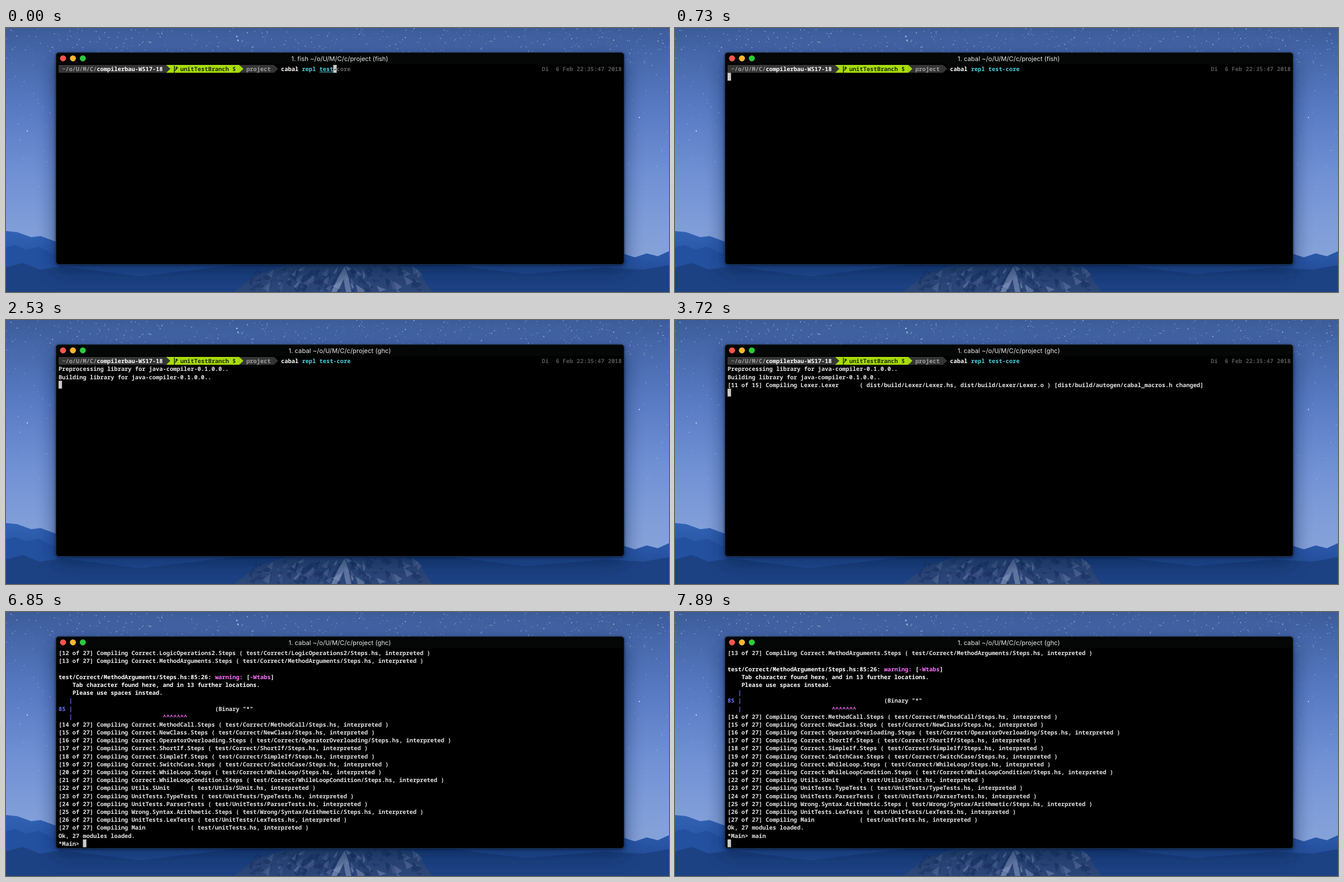
Animation of 1186x472 px, one loop 8 s. Source, as an HTML page:

```html
<!DOCTYPE html>
<html lang="en">
<head>
<meta charset="utf-8">
<title>Terminal session</title>
<style>
  html, body { margin: 0; width: 100%; height: 100%; overflow: hidden; background: #000; }
  svg { display: block; width: 100vw; height: 100vh; }
  text { white-space: pre; text-rendering: geometricPrecision; }
  #screen { font: 600 10.367px "Noto Sans Mono", "DejaVu Sans Mono", monospace; }
  #title { font: 400 11.3px Inter, Roboto, sans-serif; fill: #e6e6e6; text-anchor: middle; }
</style>
</head>
<body>
<svg viewBox="0 0 1186 472" preserveAspectRatio="none">
  <defs>
    <linearGradient id="sky" x1="0" y1="0" x2="0" y2="1">
      <stop offset="0" stop-color="#3c5c99"/>
      <stop offset=".1" stop-color="#4667a9"/>
      <stop offset=".3" stop-color="#587ac3"/>
      <stop offset=".55" stop-color="#7090d4"/>
      <stop offset=".75" stop-color="#7f9dd8"/>
      <stop offset=".88" stop-color="#86a2da"/>
    </linearGradient>
    <linearGradient id="land" x1="0" y1="360" x2="0" y2="472" gradientUnits="userSpaceOnUse">
      <stop offset="0" stop-color="#3263b4"/>
      <stop offset=".5" stop-color="#2854a4"/>
      <stop offset="1" stop-color="#1f4384"/>
    </linearGradient>
    <filter id="blur" x="-10%" y="-20%" width="120%" height="140%">
      <feGaussianBlur stdDeviation="16"/>
    </filter>
    <filter id="soft" x="-5%" y="-5%" width="110%" height="110%">
      <feGaussianBlur stdDeviation="2"/>
    </filter>
  </defs>
  <rect width="1186" height="472" fill="url(#sky)"/>
  <g id="stars"></g>
  <path fill="url(#land)" d="M0 363L20 365 45 374 62 372 92 383 150 396 1080 412 1106 404 1125 410 1146 403 1166 408 1186 399V472H0Z"/>
  <path fill="#2450a0" d="M0 392L16 388 36 396 58 391 80 402 110 410V472H0Z"/>
  <path fill="#1d4283" d="M0 428L30 420 60 432 100 426 240 444 390 426 450 420 800 424 930 440 1070 428 1140 432 1186 424V472H0Z"/>
  <path fill="#2c4779" d="M408 472L450 440 500 424 560 420 700 420 738 434 762 472Z"/>
  <g id="rocks"></g>
  <rect x="88" y="56" width="1019" height="378" rx="8" opacity=".6" filter="url(#blur)" fill="#061a42"/>
  <rect x="89" y="45" width="1017" height="379" rx="5" opacity=".6" filter="url(#soft)" fill="#04102a"/>
  <rect x="89.5" y="44" width="1016" height="378.5" rx="5" fill="#000" stroke="#1d2f3b"/>
  <path fill="#050606" d="M90.5 64V49Q90.5 45 94.5 45H1100.5Q1104.5 45 1104.5 49V64Z"/>
  <circle cx="102" cy="54.3" r="5.4" fill="#f7564c"/>
  <circle cx="119.7" cy="54.3" r="5.4" fill="#f6b82c"/>
  <circle cx="137.4" cy="54.3" r="5.4" fill="#2fc940"/>
  <text id="title" x="597" y="58.6"></text>
  <g id="screen"></g>
</svg>
<script>
const LOOP = 8000, LEFT = 94, TOP = 66, CELL = 6.22, ROW = 14.19;
const TEXT = '#e4e4e4', WHITE = '#ffffff', PINK = '#ff70ff', BLUE = '#6871ff';
const CYAN = '#4fcfdd', DIM = '#555555', GREY = '#353535', GREEN = '#a8dc0a';
const byId = id => document.getElementById(id);
const colX = col => LEFT + col * CELL;
const rowY = row => TOP + row * ROW;
const escape = s => s.replace(/&/g, '&amp;').replace(/</g, '&lt;');

// One run of text on the character grid
const run = (row, col, str, fill = TEXT, weight = 600) =>
  `<text x="${colX(col)}" y="${rowY(row) + 11.2}" fill="${fill}" font-weight="${weight}">${escape(str)}</text>`;
const bold = (row, col, str, fill = WHITE) => run(row, col, str, fill, 800);
const cursor = (row, col) =>
  `<rect x="${colX(col)}" y="${rowY(row)}" width="${CELL}" height="14" fill="#c9c9c9"/>`;

const bar = (from, to, fill) =>
  `<rect x="${colX(from)}" y="${TOP}" width="${(to - from) * CELL}" height="14" fill="${fill}"/>`;
const arrow = (col, fill) =>
  `<path d="M${colX(col) - .3} ${TOP}l7.5 7-7.5 7z" fill="${fill}"/>`;

const header = bar(0, 31, GREY) + bar(31, 52, GREEN) + bar(52, 62, GREY) +
  arrow(31, GREY) + arrow(52, GREEN) + arrow(62, GREY) +
  run(0, 1, '~/o/U/M/C/', '#a0a0a0') + bold(0, 11, 'compilerbau-WS17-18') +
  '<path d="M301.3 67.5V80M301.3 76Q305.3 75 305.3 70.5M303.4 72.3l1.9-2.4 1.9 2.4" fill="none" stroke="#1d2a00" stroke-width="1.5"/>' +
  run(0, 35, 'unitTestBranch $', '#1d2a00') + run(0, 54, 'project', '#a0a0a0') +
  bold(0, 64, 'cabal') + run(0, 70, 'repl', CYAN) +
  run(0, 139, 'Di  6 Feb 22:35:47 2018', DIM);

function typing(count) {
  const word = 'test-core', end = 75 + count;
  let out = header + run(0, 75, word.slice(0, count), CYAN) +
    run(0, end, word.slice(count), '#666666') + cursor(0, end) +
    run(0, end, word.charAt(count), '#222222');
  if (count === 4) out += `<path d="M${colX(75)} 78.8H${colX(79)}" stroke="${CYAN}"/>`;
  return out;
}

const step = (n, total, module, rest) =>
  `[${n} of ${total}] Compiling ${module.padEnd(16)} ( ${rest}`;
const built = (n, name) => step(n, 15, `${name}.${name}`,
  `dist/build/${name}/${name}.hs, dist/build/${name}/${name}.o ) [dist/build/autogen/cabal_macros.h changed]`);
const output = [
  'Preprocessing library for java-compiler-0.1.0.0..',
  'Building library for java-compiler-0.1.0.0..',
  built(11, 'Lexer'),
  built(13, 'Parser')
];
const building = count => header + run(0, 75, 'test-core', CYAN) +
  output.slice(0, count).map((line, i) => run(i + 1, 0, line)).join('') + cursor(count + 1, 0);

const interpreted = (n, module, path = module.replace(/\./g, '/')) =>
  step(n, 27, module, `test/${path}.hs, interpreted )`);
const plain = str => row => run(row, 0, str);
const gutter = row => bold(row, 3, '|', BLUE);
const modules = [
  'Correct.MethodCall.Steps', 'Correct.NewClass.Steps', 'Correct.OperatorOverloading.Steps',
  'Correct.ShortIf.Steps', 'Correct.SimpleIf.Steps', 'Correct.SwitchCase.Steps',
  'Correct.WhileLoop.Steps', 'Correct.WhileLoopCondition.Steps', 'Utils.SUnit',
  'UnitTests.TypeTests', 'UnitTests.ParserTests', 'Wrong.Syntax.Arithmetic.Steps',
  'UnitTests.LexTests'
];
const log = [
  plain(interpreted(12, 'Correct.LogicOperations2.Steps')),
  plain(interpreted(13, 'Correct.MethodArguments.Steps')),
  () => '',
  row => bold(row, 0, 'test/Correct/MethodArguments/Steps.hs:85:26:') +
    bold(row, 45, 'warning:', PINK) + bold(row, 54, '[') + bold(row, 55, '-Wtabs', PINK) + bold(row, 61, ']'),
  row => bold(row, 4, 'Tab character found here, and in 13 further locations.'),
  row => bold(row, 4, 'Please use spaces instead.'),
  gutter,
  row => bold(row, 0, '85', BLUE) + gutter(row) + run(row, 45, '(Binary "*"'),
  row => gutter(row) + bold(row, 30, '^^^^^^^', PINK),
  ...modules.map((name, i) => plain(interpreted(14 + i, name))),
  plain(interpreted(27, 'Main', 'unitTests')),
  plain('Ok, 27 modules loaded.')
];

function session(typed, scroll = 0) {
  const lines = log.slice(scroll);
  const last = lines.length;
  return lines.map((line, row) => line(row)).join('') + run(last, 0, '*Main> ' + typed) +
    (scroll ? cursor(last + 1, 0) : cursor(last, 7 + typed.length));
}

const pointer = (x, y) =>
  `<path d="M${x + .5} ${y + .5}q3 0 3 2.5v8q0 2.5-3 2.5M${x + 6.5} ${y + .5}q-3 0-3 2.5v8q0 2.5 3 2.5" fill="none" stroke="#e4e4e4"/>`;

const title = (job, shell) => `1. ${job} ~/o/U/M/C/c/project (${shell})`;
const FISH = title('fish', 'fish'), START = title('cabal', 'fish'), GHC = title('cabal', 'ghc');
const scenes = [
  [0, FISH, () => typing(4)],
  [150, FISH, () => typing(5)],
  [290, FISH, () => typing(6)],
  [440, FISH, () => typing(8)],
  [590, FISH, () => typing(9)],
  [730, START, () => building(0)],
  [1480, START, () => building(2)],
  [2530, GHC, () => building(2)],
  [3130, GHC, () => building(3)],
  [3270, GHC, () => building(3) + pointer(953, 69)],
  [3420, GHC, () => building(3) + pointer(977, 159)],
  [3720, GHC, () => building(3)],
  [4770, GHC, () => building(4)],
  [6850, GHC, () => session('')],
  [7450, GHC, () => session('ma')],
  [7590, GHC, () => session('main')],
  [7890, GHC, () => session('main', 1)]
];

let seed = 11;
const random = () => (seed = (seed * 16807) % 2147483647) / 2147483647;

function paintStars() {
  const star = (x, y, size, alpha) =>
    `<circle cx="${x.toFixed(1)}" cy="${y.toFixed(1)}" r="${size.toFixed(2)}" fill="#c9d8f6" opacity="${alpha.toFixed(2)}"/>`;
  let out = star(413, 15, 1.3, .9) + star(415, 22, 1.3, .9) + star(38, 184, 1.2, .9) + star(1133, 160, 1.2, .9);
  for (let i = 0; i < 400; i++)
    out += star(random() * 1186, random() * 44, .4 + random() * .6, .35 + random() * .5);
  for (let i = 0; i < 90; i++) {
    const x = random() * 88;
    out += star(i % 2 ? x : 1106 + x * .9, 44 + random() ** 1.7 * 240, .4 + random() * .5, .25 + random() * .5);
  }
  byId('stars').innerHTML = out;
}

// Rock facets slope away from the peak at x 605, brightest next to it
function paintRocks() {
  const tones = ['#7185ae', '#1f3768', '#1b3363', '#4c6291'];
  let out = '';
  for (let i = 0; i < 130; i++) {
    const x = 440 + random() * 300, y = 422 + random() * 46;
    const side = x < 605 ? -1 : 1, near = 1 - Math.abs(x - 605) / 170;
    const w = side * (5 + random() * 13), h = 3 + random() * 10;
    const alpha = i % 3 ? .6 : .25 + near * .5;
    out += `<path d="M${x} ${y}l${w} ${h}l${-w * .7} ${h * .6}z" fill="${tones[i % 3 ? 1 + i % 2 : i % 2 * 3]}" opacity="${alpha}"/>`;
  }
  out += '<path d="M606 426l-10 16-14 30h10l12-22 4 22h10l-6-28z" fill="#7f93bb" opacity=".65"/>';
  byId('rocks').innerHTML = out;
}

let shown = null;
function render(time) {
  const scene = scenes.findLast(s => s[0] <= time);
  if (scene === shown) return;
  shown = scene;
  byId('title').textContent = scene[1];
  byId('screen').innerHTML = scene[2]();
}

paintStars();
paintRocks();
render(0);
const begin = performance.now();
function tick() {
  render((performance.now() - begin) % LOOP);
  requestAnimationFrame(tick);
}
requestAnimationFrame(tick);
</script>
</body>
</html>
```
